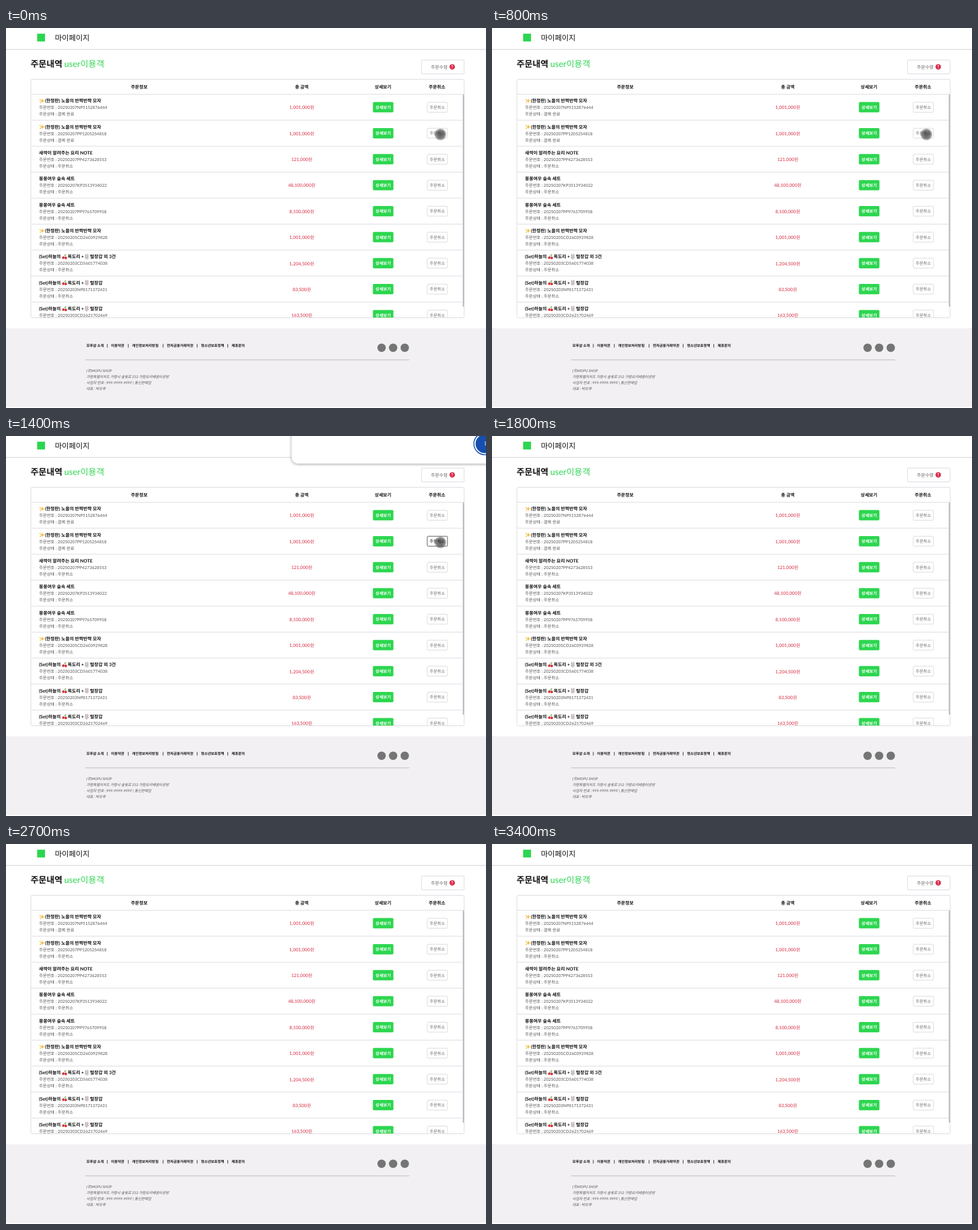
These frames come from a looping animation (800x634 px, 3500 ms). An HTML page:

```html
<!DOCTYPE html>
<html lang="ko">
<head>
<meta charset="utf-8">
<title>마이페이지</title>
<style>
  html, body { margin: 0; width: 100%; height: 100%; overflow: hidden; background: #fff; }
  svg { display: block; width: 800px; height: 634px; }
  text { font-family: Lato, "Noto Sans CJK KR", "Noto Sans CJK", "Noto Sans CJK JP", sans-serif;
         text-rendering: geometricPrecision; white-space: pre; }
</style>
</head>
<body>
<svg id="stage" viewBox="0 0 800 634">
  <defs>
    <clipPath id="listClip"><rect x="41" y="110" width="723" height="373"/></clipPath>
    <filter id="shadow" x="-10%" y="-30%" width="120%" height="180%">
      <feDropShadow dx="0" dy="1" stdDeviation="2" flood-color="#000" flood-opacity=".38"/>
    </filter>
    <radialGradient id="pointerFill">
      <stop offset="0" stop-color="#333" stop-opacity=".8"/>
      <stop offset=".65" stop-color="#444" stop-opacity=".7"/>
      <stop offset="1" stop-color="#666" stop-opacity=".4"/>
    </radialGradient>
  </defs>
  <g id="page"></g>
  <g id="dialog" filter="url(#shadow)">
    <rect x="476" y="-80" width="360" height="126" rx="10" fill="#fff" stroke="#d4d4d8" stroke-width=".6"/>
    <rect id="focusRing" x="779.8" y="-5.2" width="90" height="36.4" rx="18.2" fill="none" stroke="#174fae" stroke-width="1.5"/>
    <rect id="confirm" x="782.6" y="-2.4" width="90" height="30.8" rx="15.4"/>
    <text x="797" y="17" font-size="10" fill="#fff">확인</text>
  </g>
  <circle id="pointer" r="9.8" fill="url(#pointerFill)"/>
</svg>
<script>
const LOOP = 3500;
const ROW_TOP = 110, ROW_STEP = 43.35;
const GREEN = '#2dd650', RED = '#d93a50', LINE = '#dcdce2', INK = '#111', GRAY = '#555';
const $ = id => document.getElementById(id);
const page = $('page');

function add(parent, tag, attrs, content) {
  const node = document.createElementNS('http://www.w3.org/2000/svg', tag);
  for (const key in attrs) node.setAttribute(key, attrs[key]);
  if (content !== undefined) node.textContent = content;
  parent.appendChild(node);
  return node;
}

const text = (parent, x, y, content, size, fill = INK, weight = 400, extra = {}) =>
  add(parent, 'text', { x, y, 'font-size': size, fill, 'font-weight': weight, ...extra }, content);
const centered = (parent, x, y, content, size, fill, weight) =>
  text(parent, x, y, content, size, fill, weight, { 'text-anchor': 'middle' });
const rect = (parent, x, y, width, height, fill, extra = {}) =>
  add(parent, 'rect', { x, y, width, height, fill, ...extra });
const circle = (parent, cx, cy, r, fill) => add(parent, 'circle', { cx, cy, r, fill });
const path = (parent, d, attrs) => add(parent, 'path', { d, ...attrs });

function sparkle(parent, x, y) {
  const star = (cx, cy, r) => {
    const k = r * 0.25;
    path(parent, `M${cx} ${cy - r}l${k} ${r - k}l${r - k} ${k}l${k - r} ${k}l${-k} ${r - k}l${-k} ${k - r}l${k - r} ${-k}l${r - k} ${-k}z`,
      { fill: '#f4b63c' });
  };
  star(x + 0.8, y, 4);
  star(x - 2.8, y - 2.2, 1.8);
  star(x - 2.4, y + 2.5, 1.8);
}

function cherries(parent, x, y) {
  path(parent, `M${x - 2} ${y + 1}Q${x - 1} ${y - 2} ${x + 2} ${y - 4}Q${x + 1} ${y - 1} ${x + 2} ${y + 1}`,
    { fill: 'none', stroke: '#6a9a3b', 'stroke-width': 0.9 });
  circle(parent, x - 2, y + 1.6, 2.1, '#d62f38');
  circle(parent, x + 2.1, y + 2, 2.1, '#d62f38');
}

function rabbit(parent, x, y) {
  for (const side of [-1.6, 1.6])
    add(parent, 'ellipse', { cx: x + side, cy: y - 2.2, rx: 1, ry: 2.4, fill: '#d9c3cc', stroke: '#a49aa6', 'stroke-width': 0.5 });
  add(parent, 'ellipse', { cx: x, cy: y + 1.4, rx: 2.9, ry: 2.6, fill: '#ddd6dd', stroke: '#a49aa6', 'stroke-width': 0.5 });
  circle(parent, x - 1.1, y + 1, 0.45, '#444');
  circle(parent, x + 1.1, y + 1, 0.45, '#444');
  circle(parent, x, y + 2, 0.5, '#d87b8c');
}

const titles = {
  glasses(row, y) {
    sparkle(row, 59.7, y - 2.6);
    text(row, 65, y, '(한정판) 노을의 반짝반짝 모자', 7.6, INK, 700);
  },
  book(row, y) { text(row, 55, y, '새싹이 알려주는 요리 NOTE', 7.6, INK, 700); },
  duck(row, y) { text(row, 55, y, '몽몽여우 숲속 세트', 7.6, INK, 700); },
  set(row, y, suffix = '') {
    text(row, 55, y, '(Set)하늘의', 7.6, INK, 700);
    cherries(row, 97.5, y - 2.6);
    text(row, 102.8, y, '목도리 +', 7.6, INK, 700);
    rabbit(row, 134.6, y - 2.6);
    text(row, 140, y, '털장갑' + suffix, 7.6, INK, 700);
  }
};

const CANCELLED = '주문취소', PAID = '결제 완료';
const orders = [
  ['glasses', '20250207NP5152876444', '1,001,000', PAID],
  ['glasses', '20250207PP1205254818', '1,001,000', PAID],
  ['book', '20250207PP4273628553', '121,000', CANCELLED],
  ['duck', '20250207KP3513934022', '48,100,000', CANCELLED],
  ['duck', '20250207PP9765709958', '8,100,000', CANCELLED],
  ['glasses', '20250205CD2603929828', '1,001,000', CANCELLED],
  ['set', '20250203CD5601774038', '1,204,500', CANCELLED, ' 외 3건'],
  ['set', '20250203NP8171372431', '83,500', CANCELLED],
  ['set', '20250203CD2621702469', '163,500', CANCELLED]
];

function buildRow(list, [kind, number, price, status, suffix], index) {
  const top = ROW_TOP + index * ROW_STEP;
  const row = add(list, 'g', {});
  if (index) rect(row, 42, top, 719, 1, LINE);
  titles[kind](row, top + 14.2, suffix);
  text(row, 55, top + 25.2, '주문번호 : ' + number, 7, GRAY);
  const statusText = text(row, 55, top + 36.2, '주문상태 : ' + status, 7, GRAY);
  centered(row, 493, top + 25.4, price + '원', 7.6, RED, 500);
  rect(row, 611.5, top + 13.6, 34.2, 17.2, GREEN, { rx: 1.8 });
  centered(row, 628.6, top + 25, '상세보기', 7, '#fff', 700);
  const box = rect(row, 702, top + 13.9, 33.8, 16.6, '#fff', { rx: 1.8, stroke: '#d6d6dc', 'stroke-width': 0.9 });
  const label = centered(row, 718.8, top + 25, '주문취소', 6.9, '#666', 400);
  return { statusText, box, label };
}

function buildHeader() {
  rect(page, 0, 0, 800, 634, '#fff');
  rect(page, 0, 35, 800, 1, '#d9d9de');
  rect(page, 0, 36, 800, 1, '#f1f1f4');
  rect(page, 52, 9.5, 13, 13, GREEN);
  text(page, 81.5, 20.5, '마이페이지', 12.6, INK, 500);
  text(page, 41, 65.3, '주문내역', 14.4, INK, 700);
  text(page, 97, 65.3, 'user이용객', 14.4, GREEN, 400);
  rect(page, 692.5, 53.5, 71, 23, '#fff', { rx: 1.5, stroke: LINE });
  text(page, 708, 67.8, '주문수령', 7.6, '#666');
  circle(page, 743.7, 64.8, 4.6, '#d9304f');
  centered(page, 743.7, 67.4, '?', 7.2, '#fff', 700);
}

function buildTable() {
  rect(page, 41.5, 85.5, 722, 398, '#fff', { rx: 2, stroke: LINE });
  const heads = { 222: '주문정보', 493: '총 금액', 628.3: '상세보기', 718.3: '주문취소' };
  for (const x in heads) centered(page, x, 100.6, heads[x], 7.5, INK, 700);
  rect(page, 42, 110, 721, 1, LINE);
  const list = add(page, 'g', { 'clip-path': 'url(#listClip)' });
  const rows = orders.map((order, i) => buildRow(list, order, i));
  rect(page, 761.3, 111, 2.2, 354, '#b9b9c0', { rx: 1 });
  return rows;
}

function buildFooter() {
  rect(page, 0, 501, 800, 131, '#f2f0f3');
  const links = { 134: '모푸샵 소개', 175: '이용약관', 210: '개인정보처리방침',
    268: '전자금융거래약관', 325: '청소년보호정책', 376: '제휴문의' };
  for (const x in links) text(page, x, 532.2, links[x], 6, INK, 700);
  for (const x of [168.4, 203.4, 261.4, 318.2, 369.2]) rect(page, x, 527.2, 0.9, 6, '#222');
  for (const x of [626, 645.2, 664.6]) circle(page, x, 533.5, 7, '#757575');
  rect(page, 132, 553.3, 540, 0.9, '#b4b4b8');
  ['(주)MOPU SHOP', '가람특별자치도 가람시 솔빛로 252 가람요리배움터공방',
    '사업자 번호 : 999-9999-9999 | 통신판매업', '대표 : 박모루']
    .forEach((line, i) => text(page, 134, 574.2 + i * 10.05, line, 6, GRAY, 400, { 'font-style': 'italic' }));
}

buildHeader();
const target = buildTable()[1];
buildFooter();

const between = (t, from, to) => t >= from && t < to;
const show = (node, on) => node.setAttribute('visibility', on ? 'visible' : 'hidden');

function render(t) {
  const asking = between(t, 1300, 1800);
  const notified = between(t, 1900, 2200);
  show($('dialog'), asking || notified);
  $('focusRing').setAttribute('opacity', notified ? 0 : 1);
  $('confirm').setAttribute('fill', notified ? '#4471bd' : '#174fae');
  $('dialog').setAttribute('transform', notified ? 'translate(-.5 -6)' : '');

  const pressed = between(t, 1300, 1600);
  target.box.setAttribute('stroke', pressed ? '#444' : '#d6d6dc');
  target.label.setAttribute('fill', pressed ? '#000' : '#666');
  target.statusText.textContent = '주문상태 : ' + (t < 1900 ? PAID : CANCELLED);

  const p = Math.min(1, Math.max(0, (t - 1500) / 300));
  const eased = p * p * (3 - 2 * p);
  $('pointer').setAttribute('cx', 724 + 86 * eased);
  $('pointer').setAttribute('cy', 177.5 - 195 * eased);
  show($('pointer'), t < 1800);
}

const start = performance.now();
function tick() {
  render((performance.now() - start) % LOOP);
  requestAnimationFrame(tick);
}
tick();
</script>
</body>
</html>
```
